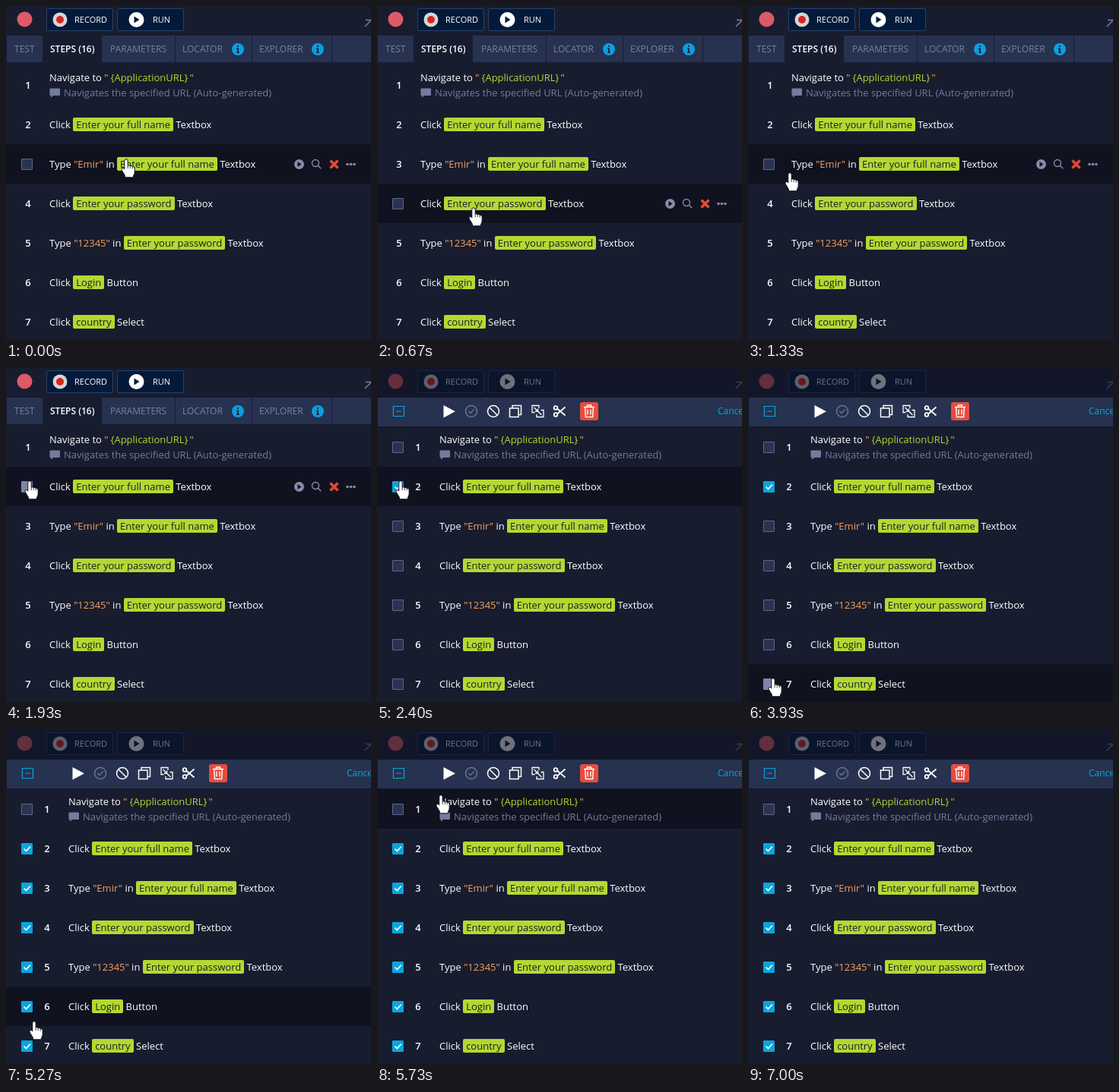
Recreate the animation shown at these times as an HTML page. Size 480 by 440 pixels, loop 7740 ms.

```html
<!DOCTYPE html>
<html lang="en">
<head>
<meta charset="utf-8">
<title>Test steps</title>
<style>
html, body { margin: 0; width: 100%; height: 100%; overflow: hidden; background: #181c2f; }
#stage {
  position: relative; width: 480px; height: 440px; overflow: hidden;
  background: #181c2f; color: #fff; font: 13px "Open Sans", sans-serif; white-space: pre;
}
#stage > *, .row > * { position: absolute; }
svg { left: 0; top: 0; overflow: hidden; }

.btn {
  top: 3px; width: 86px; height: 28px; border: 1px solid #2a4166; border-radius: 2px;
  background: #031a3a; font-size: 11px; line-height: 28px;
}
.btn span { position: absolute; }
.tab {
  top: 39px; height: 35px; box-sizing: border-box; background: #263250; color: #77819f;
  font-size: 12px; line-height: 35px;
}
.tab.on { background: #181c2f; color: #fff; font-weight: 600; }

#dim { left: 0; top: 0; width: 480px; height: 78px; background: rgba(15, 19, 35, .6); }
#bar { left: 1px; top: 39px; width: 479px; height: 38px; background: #26324f; }
#cancel { left: 448px; top: 39px; font-size: 12px; line-height: 35px; color: #0ba4e0; }
.picking { visibility: hidden; }
.pick .picking { visibility: visible; }

.row { left: 0; width: 480px; height: 52px; line-height: 52px; }
.row.hover { background: #10121f; }
.num { left: 19px; width: 20px; text-align: center; font-weight: 600; }
.text { left: 57px; }
.two { top: 6px; line-height: 20px; }
.note { left: 76px; top: 26px; line-height: 20px; color: #737c9d; }
.mark { left: 57px; top: 30px; }
.pick .num { left: 44px; }
.pick .text { left: 82px; }
.pick .note { left: 101px; }
.pick .mark { left: 82px; }
.box {
  left: 20px; top: 19px; width: 13px; height: 13px; visibility: hidden;
  border: 1px solid #5d6788; border-radius: 1px; background: #2a3351;
}
.pick .box, .hover .box { visibility: visible; }
.hover .num { visibility: hidden; }
.pick .num { visibility: visible; }
.box.over { background: #7c85a6; border-color: #7c85a6; }
.box.done { background: #0aa5de; border-color: #0aa5de; }
.box svg { position: absolute; display: none; }
.box.done svg { display: block; }
.chip { padding: 0 4px; border-radius: 2px; background: #b3d931; color: #181c2f; }
.str { color: #f5a25d; }
.var { margin: 0 2px 0 3px; color: #b3d931; }

#tip {
  left: 84px; top: 76px; width: 83px; height: 17px; border: 1px solid #767676;
  background: #fff; color: #575757; font-size: 12px; line-height: 17px; text-align: center;
}
</style>
</head>
<body>
<div id="stage">
  <div class="btn" style="left:53px"><span style="left:36px">RECORD</span></div>
  <div class="btn" style="left:146px"><span style="left:46px">RUN</span></div>
  <div class="tab" style="left:1px;width:47px;padding-left:10px">TEST</div>
  <div class="tab on" style="left:48px;width:78px;padding-left:10px">STEPS (16)</div>
  <div class="tab" style="left:126px;width:96px;padding-left:11px">PARAMETERS</div>
  <div class="tab" style="left:223px;width:100px;padding-left:9px">LOCATOR</div>
  <div class="tab" style="left:324px;width:104px;padding-left:9px">EXPLORER</div>
  <div class="tab" style="left:429px;width:51px"></div>

  <svg width="480" height="78">
    <circle cx="24.5" cy="17.5" r="10" fill="#dd5a68"/>
    <circle cx="71" cy="18" r="9.5" fill="#d6d6d8"/>
    <circle cx="71" cy="18" r="5" fill="#d8261c"/>
    <circle cx="171.5" cy="18" r="10" fill="#fff"/>
    <path d="M168.5 13.5v9l7-4.5z" fill="#031a3a"/>
    <path d="M472 27l8-8M473 18.5h7" fill="none" stroke="#76809e" stroke-width="1.5"/>
    <g id="info">
      <circle cx="305" cy="57" r="8" fill="#0a9fe0"/>
      <path d="M304 52h2v2h-2zM303 55.500h3v5h1v1.500h-4v-1.500h1v-3.500h-1z" fill="#1b2440"/>
    </g>
    <use href="#info" x="105"/>
  </svg>

  <div id="dim" class="picking"></div>
  <div id="bar" class="picking"></div>
  <div id="cancel" class="picking">Cancel</div>
  <svg class="picking" width="480" height="78" fill="none" stroke="#fff" stroke-width="1.5">
    <rect id="glow" x="83" y="45" width="24" height="24" rx="3" fill="#435176" stroke="none"/>
    <path d="M21.500 50.500h14v13h-14zM25 57h7" stroke="#0ba4e0" stroke-width="1.200"/>
    <path d="M87.500 49v16.500l15.500-8.250z" fill="#fff" stroke="none"/>
    <g stroke="#69748f"><circle cx="124" cy="57" r="7.500"/><path d="M120.500 57l2.500 2.500 4.500-5"/></g>
    <circle cx="153" cy="57" r="7.500"/><path d="M147.700 51.700l10.600 10.600"/>
    <path d="M178 53v-3.500h11.500v12h-3.500M174.500 53h11.500v11.500h-11.500z"/>
    <path d="M213 53v-3.500h-9v9h3.500M210 61v3.500h9v-9h-3.500M206.500 52l5 5M211.500 53.500v3.500h-3.500M216.500 62l-5-5" stroke-width="1.300"/>
    <g stroke-width="1.800"><circle cx="235" cy="52.500" r="2.300"/><circle cx="235" cy="61.500" r="2.300"/>
      <path d="M237 53.500l10.500 9M237 60.500l10.500-9"/></g>
    <rect x="267" y="45" width="24" height="24" rx="3" fill="#e84c3d" stroke="none"/>
    <path d="M272 51.500h14M276.500 51v-2h5v2M273.700 52l.7 12.500h9.200l.7-12.500M277 54.500v7M281 54.500v7" stroke-width="1.400"/>
  </svg>

  <svg id="tools" width="480" height="52">
    <g fill="#858da9">
      <circle cx="385.500" cy="26.500" r="6.500"/>
      <path d="M383.500 23v7l5-3.500z" fill="#10121f"/>
      <circle cx="449" cy="26.500" r="1.800"/><circle cx="453.500" cy="26.500" r="1.800"/><circle cx="458" cy="26.500" r="1.800"/>
    </g>
    <g fill="none" stroke="#858da9" stroke-width="1.400"><circle cx="407" cy="25" r="4.500"/><path d="M410.300 28.300l4 4"/></g>
    <path d="M426.500 21.500l10 10M436.500 21.500l-10 10" stroke="#e5482f" stroke-width="3.600"/>
  </svg>
  <div id="tip">Run selected</div>
  <svg id="hand" width="20" height="28" viewBox="-8 -1 20 28">
    <path d="M-2.200 2a2.200 2.200 0 0 1 4.400 0V8q2-.8 3 .6 2-.6 3 .8 3-.4 3 2.400v5q0 2.800-1.700 4.700v2.300H-1.500v-2.300L-5.600 14.600q-1-2 .4-3 1.600-.6 3 1.400z" fill="#fff" stroke="#0c0e18"/>
    <path d="M2.200 8v4M5.200 8.800v3.400M8.200 9.600v3" stroke="#0c0e18" stroke-width=".8"/>
  </svg>
</div>
<script>
const LOOP = 7740, STEP = 200 / 3, TOP = 78, ROW = 52;
const $ = id => document.getElementById(id);
const stage = $("stage"), tools = $("tools"), hand = $("hand"), tip = $("tip"), glow = $("glow");

const chip = s => `<span class="chip">${s}</span>`;
const str = s => `<span class="str">${s}</span>`;
const steps = [
  `Navigate to ${str('"')}<span class="var">{ApplicationURL}</span>${str('"')}`,
  `Click ${chip("Enter your full name")} Textbox`,
  `Type ${str('"Emir"')} in ${chip("Enter your full name")} Textbox`,
  `Click ${chip("Enter your password")} Textbox`,
  `Type ${str('"12345"')} in ${chip("Enter your password")} Textbox`,
  `Click ${chip("Login")} Button`,
  `Click ${chip("country")} Select`
];
const note = '<svg class="mark" width="15" height="13"><path d="M1 1h12.500v8.500H5L2.500 12V9.500H1z" fill="#737c9d" stroke="#737c9d" stroke-linejoin="round"/></svg>' +
  '<div class="note">Navigates the specified URL (Auto-generated)</div>';
const tick = '<svg width="13" height="13"><path d="M2.500 6.500l3 3 5.500-6" fill="none" stroke="#fff" stroke-width="1.700"/></svg>';

const rows = steps.map((html, i) => {
  const el = document.createElement("div");
  el.style.top = TOP + i * ROW + "px";
  el.innerHTML = `<div class="num">${i + 1}</div><div class="box">${tick}</div>` +
    `<div class="text${i ? "" : " two"}">${html}</div>` + (i ? "" : note);
  stage.insertBefore(el, tools);
  return { el, box: el.querySelector(".box") };
});

// Pointer path: time, x, y of the fingertip
const path = [
  [0, 158, 202], [330, 146, 234], [670, 127, 266], [800, 118, 270], [1000, 100, 281],
  [1270, 62, 235], [1530, 33, 172], [1600, 31, 164], [1730, 31, 151], [1870, 31, 151],
  [1930, 31, 149], [2730, 31, 149], [2870, 34, 180], [3130, 43, 344], [3330, 39, 388],
  [3530, 35, 407], [3730, 35, 407], [3930, 33, 409], [5200, 33, 409], [5400, 44, 335],
  [5600, 72, 150], [5730, 84, 86], [6000, 90, 57], [6470, 90, 57], [6530, 91, 55],
  [6670, 91, 55], [6930, 62, 60], [LOOP, 62, 60]
];

function pointer(t) {
  const k = path.findIndex(p => p[0] > t);
  const [t0, x0, y0] = path[k - 1], [t1, x1, y1] = path[k];
  const u = (t - t0) / (t1 - t0);
  return [x0 + (x1 - x0) * u, y0 + (y1 - y0) * u];
}

const clamp = v => Math.max(0, Math.min(1, v));

function draw(t) {
  const [x, y] = pointer(t);
  const pick = t >= 2398, all = t >= 4465, gone = t >= 6990;
  const at = gone || y < TOP ? -1 : Math.floor((y - TOP) / ROW);

  stage.className = pick ? "pick" : "";
  rows.forEach(({ el, box }, i) => {
    const dy = y - (TOP + i * ROW + ROW / 2);
    const over = i === at && Math.abs(x - 27.5) < 8.5 && dy > -8 && dy < 7;
    const done = pick && (i === 1 || (all && i > 1));
    el.className = "row" + (i === at ? " hover" : "");
    box.className = "box" + (done ? " done" : over ? " over" : "");
  });

  tools.style.visibility = !pick && at >= 0 ? "visible" : "hidden";
  tools.style.top = TOP + at * ROW + "px";
  glow.style.opacity = Math.min(clamp((t - 6000) / 130), clamp((6930 - t) / 130));
  tip.style.visibility = t >= 6525 && t < 6790 ? "visible" : "hidden";
  hand.style.visibility = gone ? "hidden" : "visible";
  hand.style.transform = `translate(${Math.round(x) - 8}px, ${Math.round(y) - 1}px)`;
}

const start = performance.now();
function frame() {
  const t = (performance.now() - start) % LOOP;
  draw(Math.min(LOOP - 1, Math.floor((t + 4) / STEP) * STEP));
  requestAnimationFrame(frame);
}
frame();
</script>
</body>
</html>
```
